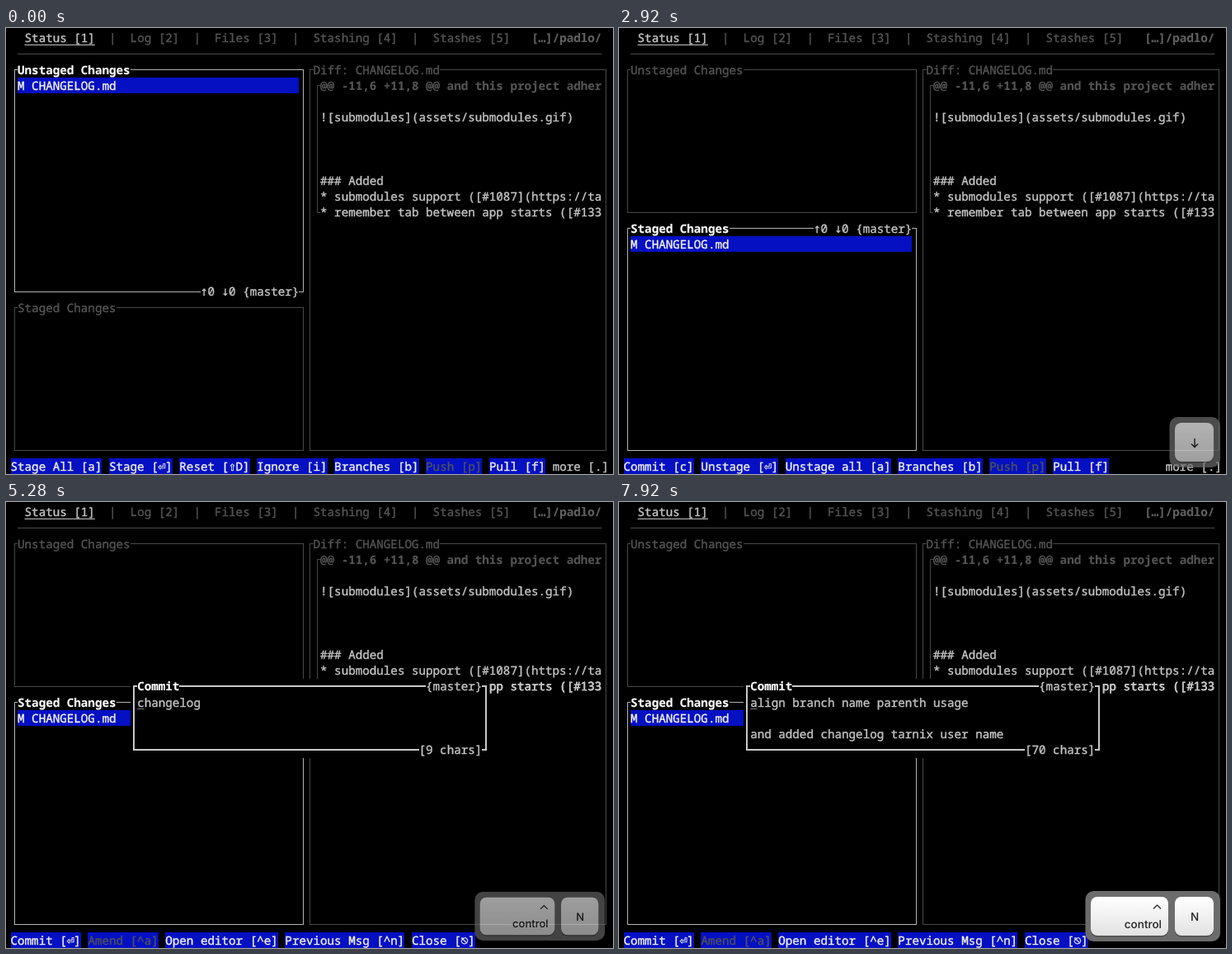
An HTML page for the animation above (8 s loop, 736 by 540 pixels).

```html
<!DOCTYPE html>
<html lang="en">
<head>
<meta charset="utf-8">
<title>Terminal commit history</title>
<style>
html, body { margin: 0; width: 100%; height: 100%; overflow: hidden; background: #000; }
svg { display: block; width: 736px; height: 540px; }
text { white-space: pre; text-rendering: geometricPrecision; }
.mono { font: 500 14.22px "Noto Sans Mono", "DejaVu Sans Mono", monospace; stroke-width: .4px; }
.bold { font-weight: 700; stroke-width: .15px; }
.sym { font: 15.5px "DejaVu Sans Mono", "DejaVu Sans", monospace; text-anchor: middle; stroke-width: .3px; }
.key { font: 500 13.5px Inter, "Liberation Sans", sans-serif; fill: #222; }
</style>
</head>
<body>
<svg id="stage" viewBox="0 0 736 540">
  <defs>
    <linearGradient id="cap" x2="0" y2="1">
      <stop offset="0" stop-color="#fff"/><stop offset="1" stop-color="#e2e2e2"/>
    </linearGradient>
  </defs>
  <rect width="736" height="540"/>
  <g id="screen"></g>
  <g id="keys"></g>
</svg>
<script>
const CW = 8.535, RH = 19.2;
const DIM = '#545454', GREY = '#c4c4c4', WHITE = '#fff', BLUE = '#0410c2', YELLOW = '#a9a20c';
const LINE = '#484848', FOCUS = '#b4b4b4';
const left = col => 5.5 + col * CW;
const top_ = row => 2.5 + row * RH;
const midX = col => left(col + .5);
const midY = row => top_(row + .5);

const rect = (x, y, w, h, fill, extra = '') =>
  `<rect x="${x}" y="${y}" width="${w}" height="${h}" fill="${fill}" ${extra}/>`;
// Cell backgrounds end on whole pixels, as a terminal draws them.
function cells(col, row, cols, rows, fill) {
  const x = Math.round(left(col)), y = Math.round(top_(row));
  return rect(x, y, Math.round(left(col + cols)) - x, Math.round(top_(row + rows)) - y, fill);
}
const path = (d, stroke, width = 1) =>
  `<path d="${d}" fill="none" stroke="${stroke}" stroke-width="${width}"/>`;

// Symbols are drawn apart from the run so that a fallback font keeps the grid.
function text(col, row, str, fill, bold = false) {
  const y = midY(row) + 5, paint = `fill="${fill}" stroke="${fill}"`;
  let out = `<text class="mono${bold ? ' bold' : ''}" x="${left(col)}" y="${y}" ${paint}>` +
    `${str.replace(/[⏎⇧⎋↑↓…]/g, ' ')}</text>`;
  [...str].forEach((c, i) => {
    if ('⏎⇧⎋↑↓…'.includes(c))
      out += `<text class="sym" x="${midX(col + i)}" y="${y}" ${paint}>${c}</text>`;
  });
  return out;
}

function box(c0, r0, c1, r1, stroke, width = 1) {
  const half = width % 2 / 2;
  const snapX = v => Math.round(v) + half;
  const snapY = v => Math.round(v - half) + half;
  const x = snapX(midX(c0)), y = snapY(midY(r0));
  return rect(x, y, snapX(midX(c1)) - x, snapY(midY(r1)) - y, 'none',
    `stroke="${stroke}" stroke-width="${width}"`);
}

const label = (col, row, str, fill, bold) =>
  cells(col, row, str.length, 1, '#000') + text(col, row, str, fill, bold);
const labelEnd = (end, row, str) => label(end - str.length, row, str, GREY);

function panel(c0, r0, c1, r1, title, focused) {
  return box(c0, r0, c1, r1, focused ? FOCUS : LINE) +
    label(c0 + 1, r0, title, focused ? WHITE : DIM, focused);
}

function header() {
  let col = 2, out = '';
  ['Status [1]', 'Log [2]', 'Files [3]', 'Stashing [4]', 'Stashes [5]'].forEach((tab, i) => {
    if (i) {
      out += text(col + 2, 0, '|', DIM);
      col += 5;
    }
    out += text(col, 0, tab, i ? DIM : GREY);
    col += tab.length;
  });
  return out + path(`M${left(2)} 20.5H${left(12)}`, GREY) +
    text(74, 0, '[…]/padlo/', '#606060', true) +
    path(`M${left(1)} 31.5H${left(84)}`, LINE);
}

function diff(shown) {
  let out = panel(42, 2, 84, 26, shown ? 'Diff: CHANGELOG.md' : 'Diff: ', false);
  if (!shown) return out;
  out += path(`M${left(44)} 69.5H377.5V223.5H${left(44)}`, LINE);
  out += text(44, 3, '@@ -11,6 +11,8 @@ and this project adher', DIM, true);
  const lines = {
    5: '![submodules](assets/submodules.gif)',
    9: '### Added',
    10: '* submodules support ([#1087](https://ta',
    11: '* remember tab between app starts ([#133'
  };
  for (const row in lines) out += text(44, +row, lines[row], GREY);
  return out;
}

// A leading "-" marks a disabled command.
function footer(commands) {
  let col = 0, out = '';
  for (const item of commands.split('|')) {
    const off = item[0] === '-', str = off ? item.slice(1) : item;
    out += cells(col, 27, str.length, 1, BLUE) + text(col, 27, str, off ? '#50505c' : '#f0f0f0');
    col += str.length + 1;
  }
  return out;
}

const selected = row => cells(1, row, 40, 1, BLUE) + text(1, row, 'M CHANGELOG.md', '#f0f0f0');
const more = () => text(77, 27, 'more [.]', GREY);

function unstagedView(staged) {
  return diff(!staged) + panel(0, 2, 41, 16, 'Unstaged Changes', true) +
    labelEnd(41, 16, '↑0 ↓0 {master}') +
    panel(0, 17, 41, 26, 'Staged Changes', false) +
    (staged ? text(1, 18, 'M CHANGELOG.md', YELLOW) : selected(3)) +
    footer(staged
      ? 'Branches [b]|-Push [p]|Pull [f]|Undo Commit [⇧U]|Submodules [⇧S]|-Edit [e]'
      : 'Stage All [a]|Stage [⏎]|Reset [⇧D]|Ignore [i]|Branches [b]|-Push [p]|Pull [f]') +
    more();
}

const stagedPanels = () => diff(true) +
  panel(0, 2, 41, 11, 'Unstaged Changes', false) +
  panel(0, 12, 41, 26, 'Staged Changes', true) +
  labelEnd(41, 12, '↑0 ↓0 {master}') + selected(13);

const stagedView = () => stagedPanels() + more() +
  footer('Commit [c]|Unstage [⏎]|Unstage all [a]|Branches [b]|-Push [p]|Pull [f]');

function commitView(lines, count) {
  let out = stagedPanels() + cells(17, 11, 51, 5, '#000') +
    box(17, 11, 67, 15, '#c8c8c8', 2) +
    label(18, 11, 'Commit', WHITE, true) + labelEnd(67, 11, '{master}') +
    text(68, 11, 'pp starts ([#133', GREY);
  if (count) {
    lines.forEach((line, i) => out += text(18, 12 + i, line, GREY));
    out += path(`M${left(18)} 250.5h${CW}`, '#777') + labelEnd(67, 15, `[${count} chars]`);
  } else {
    out += text(18, 12, 'type commit message..', DIM);
  }
  return out + footer((count ? 'Commit [⏎]|-Amend [^a]' : '-Commit [⏎]|Amend [^a]') +
    '|Open editor [^e]|Previous Msg [^n]|Close [⎋]');
}

const subject = 'align branch name parenth usage';
const views = {
  start: () => unstagedView(false),
  moved: () => unstagedView(true),
  staged: stagedView,
  empty: () => commitView([], 0),
  first: () => commitView(['changelog'], 9),
  second: () => commitView([subject], 31),
  third: () => commitView([subject, '', 'and added changelog tarnix user name'], 70)
};

const keyText = (x, y, str, anchor, extra = '') =>
  `<text class="key" x="${x}" y="${y}" text-anchor="${anchor}" ${extra}>${str}</text>`;
const glyphs = {
  return: () => keyText(713, 516, 'return', 'end'),
  down: () => path('M698 497V507M694 503.5L698 507.5L702 503.5', '#222', 1.4),
  c: () => keyText(698, 507, 'c', 'middle', 'style="font-size:15px"'),
  ctrlN: () => keyText(658, 516, 'control', 'end') +
    path('M648 492.5L652.5 488L657 492.5', '#222', 1.2) + keyText(698, 507, 'N', 'middle')
};
const keyWidths = { return: [94], down: [47], c: [47], ctrlN: [47, 94] };

function keycaps(name, opacity, scale) {
  if (!name) return '';
  let x = 729, caps = '';
  for (const w of keyWidths[name]) {
    x -= w + 8;
    caps += rect(x, 479.5, w, 47, '#000', 'rx="8" opacity=".3"') +
      rect(x, 478, w, 47, 'url(#cap)', 'rx="8"');
  }
  const x0 = x - 6.5, cx = (x0 + 729) / 2;
  return `<g opacity="${opacity}" transform="translate(${cx} 501.5) scale(${scale}) translate(${-cx} -501.5)">` +
    rect(x0, 471, 729 - x0, 61, '#6c6c6c', 'rx="10"') + caps + glyphs[name]() + '</g>';
}

// start time, view, pressed keys, key opacity, key scale
const steps = [
  [0, 'start'],
  [990, 'moved', 'return', .95],
  [1070, 'moved', 'return'],
  [1570, 'staged', 'down', .62, .965],
  [1640, 'staged', 'down', .9, .99],
  [1710, 'staged', 'down'],
  [2850, 'staged', 'down', .7],
  [2930, 'staged', 'down', .3],
  [3000, 'staged'],
  [3210, 'empty', 'c', .62, .965],
  [3280, 'empty', 'c'],
  [4420, 'empty', 'c', .4],
  [4500, 'empty'],
  [5280, 'first', 'ctrlN', .62, .965],
  [5350, 'first', 'ctrlN'],
  [6420, 'first', 'ctrlN', .7],
  [6490, 'first', 'ctrlN', .3],
  [6570, 'second', 'ctrlN', .62, .965],
  [6640, 'second', 'ctrlN'],
  [7710, 'second', 'ctrlN', .7],
  [7780, 'second', 'ctrlN', .3],
  [7850, 'third', 'ctrlN', .62, .965],
  [7920, 'third', 'ctrlN']
];

const screenGroup = document.getElementById('screen');
const keysGroup = document.getElementById('keys');
let current;

function render(time) {
  const step = steps.findLast(s => s[0] <= time);
  if (step === current) return;
  const [, view, name, opacity = 1, scale = 1] = step;
  if (!current || current[1] !== view) screenGroup.innerHTML = header() + views[view]();
  keysGroup.innerHTML = keycaps(name, opacity, scale);
  current = step;
}

const begin = performance.now();
function tick() {
  render((performance.now() - begin) % 8000);
  requestAnimationFrame(tick);
}
tick();
</script>
</body>
</html>
```
